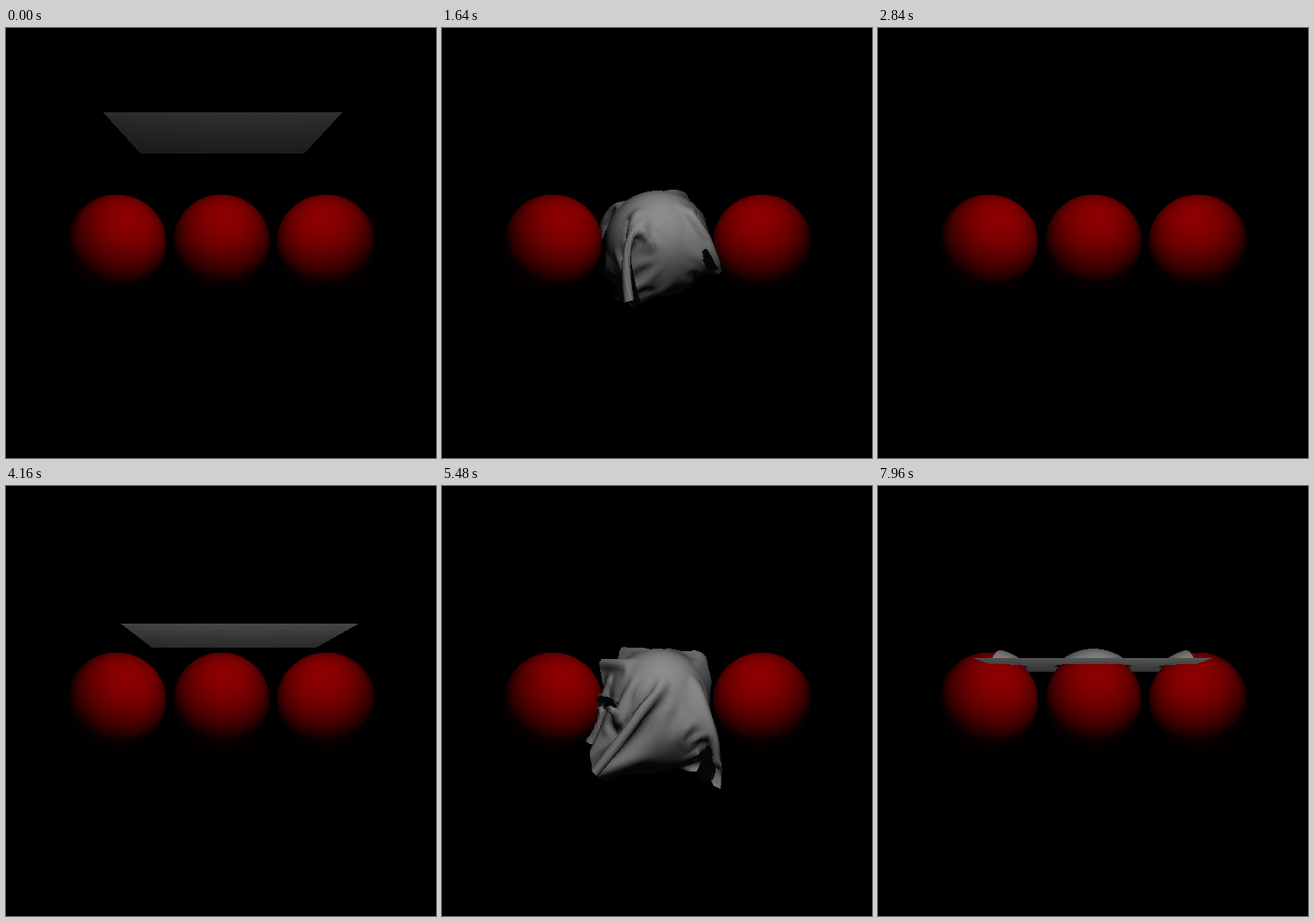
An HTML page with a canvas that plays this animation: 500x500 px, repeating every 8000 ms.

```html
<!DOCTYPE html>
<html lang="en">
<head>
<meta charset="utf-8">
<title>Falling cloth</title>
<style>
html, body { margin: 0; width: 100%; height: 100%; overflow: hidden; background: #000; }
canvas { display: block; width: 500px; height: 500px; }
</style>
</head>
<body>
<canvas id="stage" width="500" height="500"></canvas>
<script>
const SIZE = 500, FRAME_MS = 40, LOOP_MS = 8000;
// Camera at the origin with a 45 degree view; z is depth
const CX = 250.5, CY = 250, FOCAL = SIZE / 2 / Math.tan(Math.PI / 8);
const COLS = 64, ROWS = 64, COUNT = COLS * ROWS;
const WIDTH = 10, LENGTH = 10, START_Y = 5.465, NEAR_Z = 21.7;
const GRAVITY = 0.0253, DAMPING = 0.01, PASSES = 15;
const BALL_R = 2.525, CONTACT_R = 2.72, BALL_Z = 27.1, BALLS = [-5.42, 0, 5.42];
const LIGHT = [1.4, 8.7, 12.4];

const ctx = document.getElementById('stage').getContext('2d');
const image = ctx.createImageData(SIZE, SIZE);
const pixels = new Uint32Array(image.data.buffer);
const depth = new Float32Array(SIZE * SIZE);       // holds 1 / z
const ballPixels = new Uint32Array(SIZE * SIZE).fill(0xff000000);
const ballDepth = new Float32Array(SIZE * SIZE);

// Diffuse light on a surface point with the given normal, as a level from 0 to 255
function shade(x, y, z, nx, ny, nz) {
  const lx = LIGHT[0] - x, ly = LIGHT[1] - y, lz = LIGHT[2] - z;
  const cos = (lx * nx + ly * ny + lz * nz) / (Math.hypot(lx, ly, lz) * Math.hypot(nx, ny, nz) || 1);
  return 6 + 135 * Math.max(0, cos);
}

function traceBalls() {
  for (let py = 0; py < SIZE; py++) for (let px = 0; px < SIZE; px++) {
    const dx = (px + 0.5 - CX) / FOCAL, dy = (CY - py - 0.5) / FOCAL;
    const a = dx * dx + dy * dy + 1;
    for (const bx of BALLS) {
      const b = dx * bx + BALL_Z;
      const disc = b * b - a * (bx * bx + BALL_Z * BALL_Z - BALL_R * BALL_R);
      if (disc < 0) continue;
      const z = (b - Math.sqrt(disc)) / a, x = dx * z, y = dy * z, i = py * SIZE + px;
      ballPixels[i] = 0xff000000 | shade(x, y, z, x - bx, y, z - BALL_Z);
      ballDepth[i] = 1 / z;
    }
  }
}

// Links between grid neighbours one step and two steps apart
const links = [];
for (const s of [1, 2]) {
  for (let x = 0; x < COLS; x++) for (let y = 0; y < ROWS; y++) {
    const i = y * COLS + x, right = x + s < COLS, down = y + s < ROWS;
    if (right) links.push(i, i + s);
    if (down) links.push(i, i + s * COLS);
    if (right && down) links.push(i, i + s * COLS + s, i + s, i + s * COLS);
  }
}
const ends = Int32Array.from(links, i => i * 3);

class Cloth {
  constructor(firstFrame, frames, offset) {
    Object.assign(this, { firstFrame, frames });
    this.pos = new Float64Array(COUNT * 3);
    for (let i = 0; i < COUNT; i++) {
      const col = i % COLS, row = Math.floor(i / COLS);
      this.pos.set([offset + WIDTH * (col / (COLS - 1) - 0.5), START_Y,
        NEAR_Z + LENGTH * row / (ROWS - 1)], i * 3);
    }
    this.old = this.pos.slice();
    this.rest = new Float64Array(ends.length / 2);
    const p = this.pos;
    for (let k = 0; k < this.rest.length; k++) {
      const a = ends[2 * k], b = ends[2 * k + 1];
      this.rest[k] = Math.hypot(p[b] - p[a], p[b + 1] - p[a + 1], p[b + 2] - p[a + 2]);
    }
    this.poses = [Float32Array.from(p)];
  }

  step() {
    const { pos: p, old, rest } = this;
    for (let pass = 0; pass < PASSES; pass++) {
      for (let k = 0; k < rest.length; k++) {
        const a = ends[2 * k], b = ends[2 * k + 1];
        const dx = p[b] - p[a], dy = p[b + 1] - p[a + 1], dz = p[b + 2] - p[a + 2];
        const len = Math.sqrt(dx * dx + dy * dy + dz * dz) || 1e-9;
        const f = 0.5 * (1 - rest[k] / len);
        p[a] += dx * f; p[a + 1] += dy * f; p[a + 2] += dz * f;
        p[b] -= dx * f; p[b + 1] -= dy * f; p[b + 2] -= dz * f;
      }
    }
    for (let i = 0; i < p.length; i++) {
      const was = p[i];
      p[i] += (was - old[i]) * (1 - DAMPING) - (i % 3 === 1 ? GRAVITY : 0);
      old[i] = was;
    }
    for (const bx of BALLS) {
      for (let i = 0; i < p.length; i += 3) {
        const dx = p[i] - bx, dy = p[i + 1], dz = p[i + 2] - BALL_Z;
        const d = Math.sqrt(dx * dx + dy * dy + dz * dz);
        if (d >= CONTACT_R) continue;
        const k = CONTACT_R / d;
        p[i] = bx + dx * k; p[i + 1] = dy * k; p[i + 2] = BALL_Z + dz * k;
      }
    }
    this.poses.push(Float32Array.from(p));
  }

  pose(n) {
    while (this.poses.length <= n) this.step();
    return this.poses[n];
  }
}

const sx = new Float32Array(COUNT), sy = new Float32Array(COUNT);
const inv = new Float32Array(COUNT), level = new Float32Array(COUNT);

function triangle(a, b, c) {
  const ax = sx[a], ay = sy[a], bx = sx[b], by = sy[b], cx = sx[c], cy = sy[c];
  const area = (bx - ax) * (cy - ay) - (cx - ax) * (by - ay);
  if (Math.abs(area) < 1e-6) return;
  const x0 = Math.max(0, Math.ceil(Math.min(ax, bx, cx) - 0.5));
  const x1 = Math.min(SIZE - 1, Math.floor(Math.max(ax, bx, cx) - 0.5));
  const y0 = Math.max(0, Math.ceil(Math.min(ay, by, cy) - 0.5));
  const y1 = Math.min(SIZE - 1, Math.floor(Math.max(ay, by, cy) - 0.5));
  for (let py = y0; py <= y1; py++) for (let px = x0; px <= x1; px++) {
    const x = px + 0.5, y = py + 0.5;
    const u = ((bx - x) * (cy - y) - (cx - x) * (by - y)) / area;
    const v = ((cx - x) * (ay - y) - (ax - x) * (cy - y)) / area;
    const w = 1 - u - v;
    if (u < -1e-5 || v < -1e-5 || w < -1e-5) continue;
    const i = py * SIZE + px, d = u * inv[a] + v * inv[b] + w * inv[c];
    if (d <= depth[i]) continue;
    depth[i] = d;
    const g = u * level[a] + v * level[b] + w * level[c] | 0;
    pixels[i] = 0xff000000 | g * 0x010101;
  }
}

function drawCloth(p) {
  for (let i = 0; i < COUNT; i++) {
    const col = i % COLS, row = (i - col) / COLS, k = i * 3;
    const l = (col ? i - 1 : i) * 3, r = (col < COLS - 1 ? i + 1 : i) * 3;
    const n = (row ? i - COLS : i) * 3, f = (row < ROWS - 1 ? i + COLS : i) * 3;
    const ux = p[r] - p[l], uy = p[r + 1] - p[l + 1], uz = p[r + 2] - p[l + 2];
    const vx = p[f] - p[n], vy = p[f + 1] - p[n + 1], vz = p[f + 2] - p[n + 2];
    inv[i] = 1 / Math.max(1, p[k + 2]);
    sx[i] = CX + FOCAL * p[k] * inv[i];
    sy[i] = CY - FOCAL * p[k + 1] * inv[i];
    level[i] = shade(p[k], p[k + 1], p[k + 2],
      vy * uz - vz * uy, vz * ux - vx * uz, vx * uy - vy * ux);
  }
  for (let row = 0; row < ROWS - 1; row++) for (let col = 0; col < COLS - 1; col++) {
    const i = row * COLS + col;
    triangle(i, i + 1, i + COLS);
    triangle(i + 1, i + COLS + 1, i + COLS);
  }
}

const cloths = [new Cloth(0, 71, 0.055), new Cloth(91, 72, 0.77), new Cloth(182, 18, -0.02)];
let shown = -1;

function render() {
  const frame = Math.floor(performance.now() % LOOP_MS / FRAME_MS);
  if (frame !== shown) {
    shown = frame;
    pixels.set(ballPixels);
    depth.set(ballDepth);
    for (const cloth of cloths) {
      const n = frame - cloth.firstFrame;
      if (n >= 0 && n < cloth.frames) drawCloth(cloth.pose(n));
    }
    ctx.putImageData(image, 0, 0);
  }
  requestAnimationFrame(render);
}

traceBalls();
render();
</script>
</body>
</html>
```
